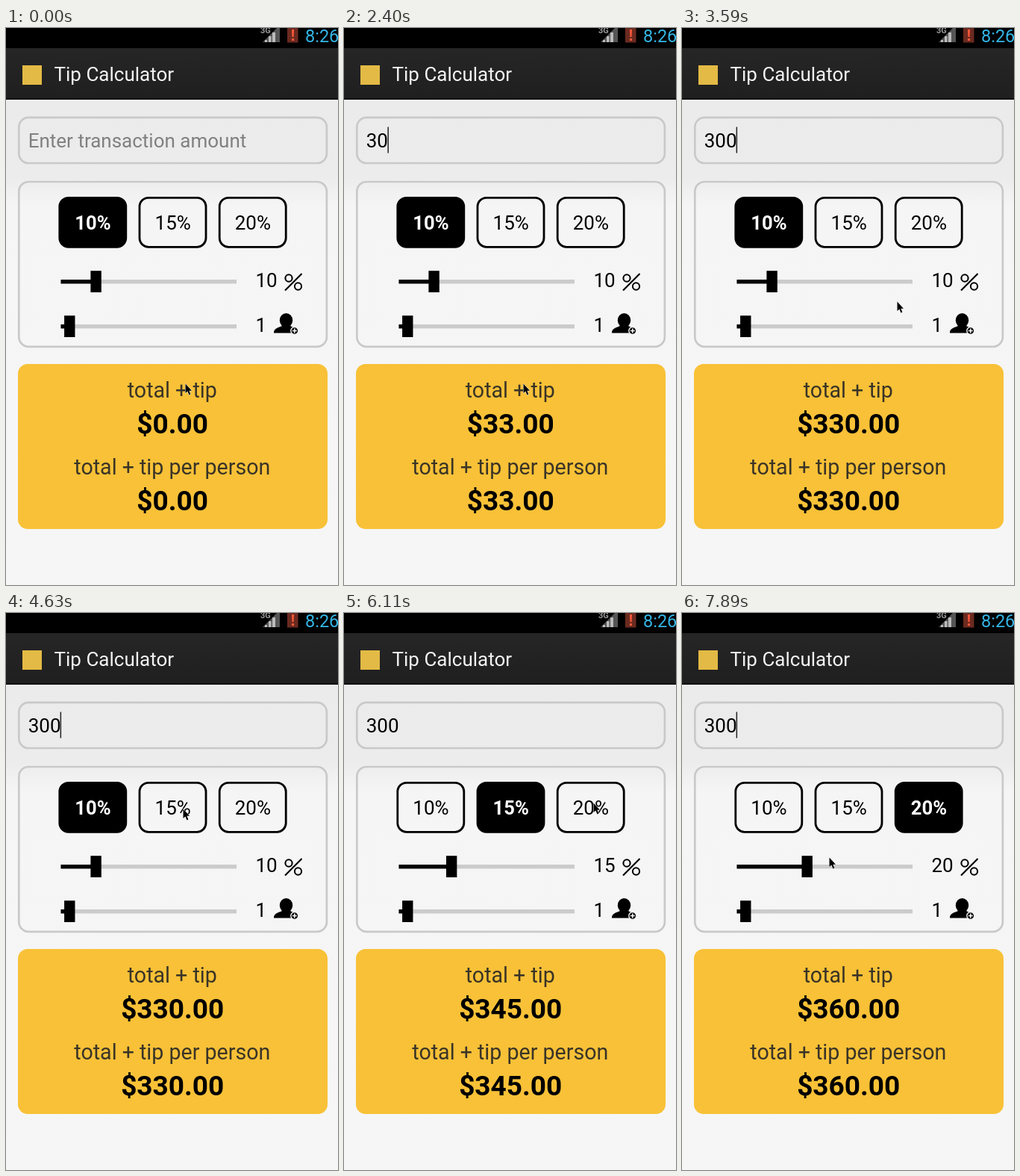
Recreate the animation shown at these times as an HTML page. Size 445x746 px, loop 8000 ms.

```html
<!DOCTYPE html>
<html lang="en">
<head>
<meta charset="utf-8">
<title>Tip Calculator</title>
<style>
html, body { margin: 0; width: 100%; height: 100%; overflow: hidden; background: #f5f5f5; }
svg { display: block; width: 445px; height: 746px; }
text { font-family: Roboto, sans-serif; font-size: 26px; white-space: pre; }
.mid { text-anchor: middle; }
.label { font-size: 28.6px; fill: #3a3427; }
.sum { font-size: 37px; font-weight: 700; }
.frame { fill: none; stroke: #c9c9c9; stroke-width: 2.7; }
.btn rect { fill: none; stroke: #000; stroke-width: 2.8; }
.btn.on rect { fill: #000; }
.btn.on text { fill: #fff; font-weight: 700; font-size: 25.6px; }
</style>
</head>
<body>
<svg viewBox="0 0 445 746">
  <defs>
    <linearGradient id="page" x2="0" y2="1">
      <stop offset="0" stop-color="#ebebeb"/>
      <stop offset=".16" stop-color="#ececec"/>
      <stop offset=".22" stop-color="#f5f5f5"/>
      <stop offset="1" stop-color="#f6f6f6"/>
    </linearGradient>
    <linearGradient id="bar" x2="0" y2="1">
      <stop offset="0" stop-color="#262626"/>
      <stop offset="1" stop-color="#1f1f1f"/>
    </linearGradient>
  </defs>
  <rect y="96" width="445" height="650" fill="url(#page)"/>

  <!-- status bar -->
  <rect width="445" height="27"/>
  <text x="341" y="6.5" style="font-size:11px;font-weight:700" fill="#999">3G</text>
  <path d="M344 19H367V-4Z" fill="#555"/>
  <path d="M347 19V16H350V19ZM352 19V11H355.5V19ZM357 19V6H361V19Z" fill="#bbb"/>
  <rect x="377" y="0" width="14.5" height="19.5" fill="#6b2a20"/>
  <path d="M383 2H386L385.5 12H383.5ZM383 14H386V17H383Z" fill="#ff5a3c"/>
  <text x="401" y="18.5" style="font-size:23.5px" fill="#33b5e5">8:26</text>

  <!-- title bar -->
  <rect y="27" width="445" height="69" fill="url(#bar)"/>
  <rect y="94" width="445" height="2" fill="#111"/>
  <rect x="22" y="50" width="26" height="26" fill="#e3ba45"/>
  <text x="64.5" y="71" fill="#f3f3f3">Tip Calculator</text>

  <!-- amount -->
  <rect class="frame" x="17.3" y="119.8" width="412.6" height="61.2" rx="13"/>
  <text id="amount" x="29.7" y="160"></text>
  <rect id="caret" y="132.5" width="1.5" height="35" fill="#222"/>

  <!-- tip settings -->
  <rect class="frame" x="17.3" y="206" width="412.6" height="220.8" rx="13"/>
  <g id="buttons"></g>
  <g id="sliders"></g>
  <text id="percent" x="334.5" y="347"></text>
  <text x="334.5" y="407">1</text>
  <g fill="none" stroke="#000" stroke-width="2.1">
    <ellipse cx="379" cy="335" rx="4.6" ry="4.8"/>
    <ellipse cx="391.5" cy="346" rx="4.6" ry="4.8"/>
    <path d="M396.5 329L374 351.5"/>
  </g>
  <ellipse cx="375.5" cy="391.5" rx="8.7" ry="9.5"/>
  <path d="M359 408.5C359 402 364 402 370 399H381C386 402 391 402 391 408.5Z"/>
  <circle cx="386.8" cy="405.5" r="5" stroke="#f5f5f5" stroke-width="1.4"/>
  <path d="M383.8 405.5H389.8M386.8 402.5V408.5" stroke="#fff" stroke-width="1.5"/>

  <!-- totals -->
  <rect x="16" y="450" width="415" height="221" rx="13" fill="#f8c137"/>
  <text class="mid label" x="222.8" y="495">total + tip</text>
  <text class="mid sum" x="223.2" y="543"></text>
  <text class="mid label" x="222.8" y="598">total + tip per person</text>
  <text class="mid sum" x="223.2" y="646"></text>

  <path id="cursor" d="M.5 .5V13L3.4 10.4L5.4 15.5L7.4 14.6L5.4 9.7H9Z"
        stroke="#fff" stroke-width="1" paint-order="stroke"/>
</svg>
<script>
const LOOP = 8000;
const $ = id => document.getElementById(id);

// Each track lists [time, value...]; a value holds until the next entry.
const typed = [[0, ''], [2100, '3'], [2400, '30'], [2700, '300']];
const tips = [[0, 10], [5220, 15], [6410, 20]];
const blinks = [150, 750, 1200, 1800, 2100, 3140, 3590, 4190, 4630, 5220, 5670, 6110, 6710, 7150, 7750];
const moves = [
  [0, 240, 476], [3290, 288, 463], [3590, 288, 366],
  [3740, 284, 338], [3890, 272, 312], [4040, 258, 290], [4340, 245, 270], [4480, 237, 262],
  [5520, 272, 260], [5670, 325, 257], [5820, 368, 255], [5970, 348, 254], [6110, 334, 254],
  [7890, 197, 327]
];
const at = (track, t) => track.filter(k => k[0] <= t).pop().slice(1);

const options = [10, 15, 20];
$('buttons').innerHTML = options.map((p, i) => {
  const x = 71.8 + i * 107.2;
  return `<g class="btn"><rect x="${x}" y="227.3" width="89" height="66" rx="12"/>
    <text class="mid" x="${x + 44.7}" y="270">${p}%</text></g>`;
}).join('');
const buttons = [...document.querySelectorAll('.btn')];
const sums = document.querySelectorAll('.sum');

function slider(y, share) {
  const x = 73.5 + 235.5 * share;
  return `<rect x="73.5" y="${y - 2.7}" width="235.5" height="5.4" fill="#cbcbcb"/>
    <rect x="73.5" y="${y - 2.7}" width="${x - 73.5}" height="5.4"/>
    <rect x="${x - 7.2}" y="${y - 14.5}" width="14.4" height="28.8"/>`;
}

function draw(now) {
  const t = now % LOOP;
  const [amount] = at(typed, t), [tip] = at(tips, t), [x, y] = at(moves, t);
  const total = '$' + (amount * (100 + tip) / 100).toFixed(2);

  $('amount').textContent = amount || 'Enter transaction amount';
  $('amount').setAttribute('fill', amount ? '#000' : '#808080');
  $('caret').setAttribute('x', 30 + amount.length * 14.2);
  $('caret').setAttribute('opacity', blinks.filter(b => b <= t).length % 2);

  buttons.forEach((b, i) => b.classList.toggle('on', options[i] === tip));
  $('sliders').innerHTML = slider(339.7, tip / 50) + slider(399.7, 1 / 20);
  $('percent').textContent = tip;
  sums.forEach(s => s.textContent = total);
  $('cursor').setAttribute('transform', `translate(${x} ${y})`);
  requestAnimationFrame(draw);
}
draw(0);
</script>
</body>
</html>
```
